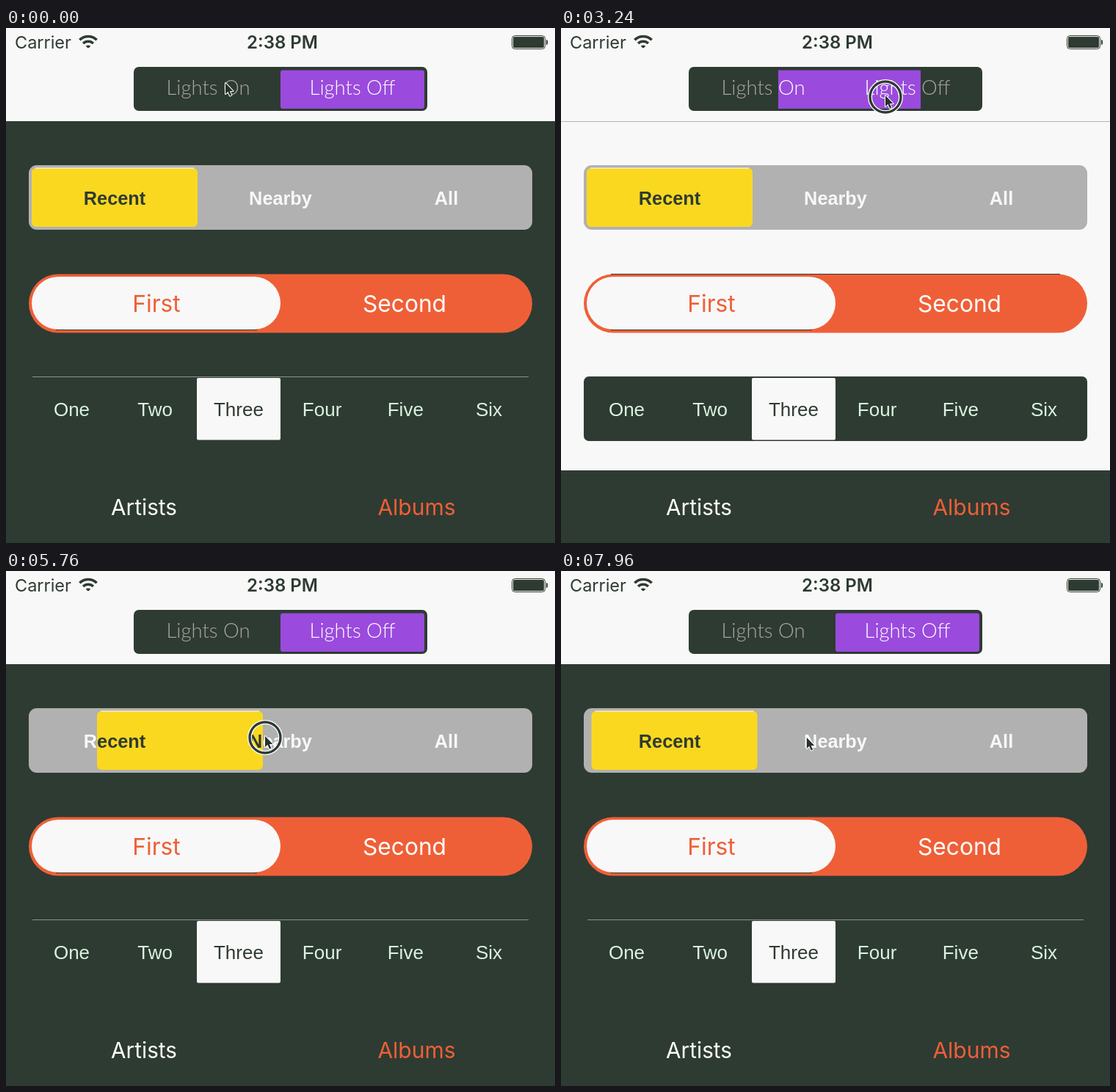
Write an HTML page with a canvas that moves like this. It is 748x702 px and loops after 8 s.

```html
<!DOCTYPE html>
<html lang="en">
<head>
<meta charset="utf-8">
<title>Segmented controls</title>
<style>
html, body { margin: 0; width: 100%; height: 100%; overflow: hidden; background: #f8f8f8; }
canvas { display: block; }
</style>
</head>
<body>
<canvas id="stage" width="748" height="702"></canvas>
<script>
const ctx = document.getElementById('stage').getContext('2d');
const LOOP = 8000, FRAME = 40;
const DARK = '#2e3b32', LIGHT = '#f8f8f8', GREY = '#b1b1b1', ORANGE = '#ef5f37',
      YELLOW = '#fbd820', PURPLE = '#9a4bdd';

const TAP = [120, 240], LIGHTS_DRAG = [880, 3440], RECENT_DRAG = [5200, 7866];

// time, pointer x, pointer y, distance from the dragged knob's left edge
const PATH = [
  [0, 299, 75, 142], [240, 305, 77, 142], [880, 320, 78, 142],
  [1480, 402, 80, 143], [2080, 324, 80, 143], [2400, 333, 80, 143],
  [3240, 442, 92, 146], [3440, 460, 92, 146], [3720, 455, 105, 160],
  [4880, 276, 218, 227], [5200, 262, 222, 227], [5760, 353, 225, 229],
  [6300, 440, 227, 227], [6900, 310, 229, 223], [7280, 367, 229, 222],
  [7866, 334, 227, 222], [8000, 335, 227, 222]
];

const during = (t, [start, end]) => t >= start && t < end;

// Smooth path through the points, flat at turning points
function sample(t, channel) {
  let i = 0;
  while (i < PATH.length - 2 && t >= PATH[i + 1][0]) i++;
  const slope = k => {
    const a = PATH[k - 1], b = PATH[k], c = PATH[k + 1];
    if (!a || !c || (b[channel] - a[channel]) * (c[channel] - b[channel]) <= 0) return 0;
    return (c[channel] - a[channel]) / (c[0] - a[0]);
  };
  const a = PATH[i], b = PATH[i + 1], span = b[0] - a[0], u = (t - a[0]) / span;
  const ease = u * u * (3 - 2 * u);
  return a[channel] + (b[channel] - a[channel]) * ease
    + span * u * (1 - u) * ((1 - u) * slope(i) - u * slope(i + 1));
}

function spring(from, to, ms) {
  const s = ms / 1000, decay = 23, freq = 20.3;
  const left = Math.exp(-decay * s) * (Math.cos(freq * s) + decay / freq * Math.sin(freq * s));
  return to + (from - to) * left;
}

const dragged = t => sample(t, 1) - sample(t, 3);

function lightsKnob(t) {
  if (t < TAP[1]) return 374;
  if (t < LIGHTS_DRAG[0]) return spring(374, 178, t - TAP[1]);
  if (t < LIGHTS_DRAG[1]) return Math.max(178, dragged(t));
  return spring(dragged(LIGHTS_DRAG[1]), 374, t - LIGHTS_DRAG[1]);
}

function recentKnob(t) {
  if (t < RECENT_DRAG[0]) return 35;
  if (t < RECENT_DRAG[1]) return Math.max(35, dragged(t));
  return spring(dragged(RECENT_DRAG[1]), 35, t - RECENT_DRAG[1]);
}

function box(x, y, w, h, r, color) {
  ctx.beginPath();
  ctx.roundRect(x, y, w, h, r);
  ctx.fillStyle = color;
  ctx.fill();
}

function text(label, x, y, font, color, align = 'center') {
  ctx.font = font;
  ctx.textAlign = align;
  ctx.fillStyle = color;
  ctx.fillText(label, x, y);
}

// track and knob: [x, y, w, h, radius, color]; labels: [text, centre x]
function control({ track, knob, labels, y, font, off, on, trim }) {
  const write = color => labels.forEach(([s, x]) => text(s, x, y, font, color));
  ctx.save();
  box(...track);
  ctx.clip();
  write(off);
  box(...knob);
  ctx.clip();
  write(on);
  ctx.restore();
  if (trim) box(...trim);
}

function statusBar() {
  text('Carrier', 12, 28, '23.5px Inter, sans-serif', DARK, 'left');
  text('2:38 PM', 376.5, 28, '600 24px Inter, sans-serif', DARK);
  ctx.strokeStyle = DARK;
  ctx.lineWidth = 3.6;
  for (const r of [2.8, 9.8, 16.5]) {
    ctx.beginPath();
    ctx.arc(112, 28, r, -Math.PI * 0.75, -Math.PI * 0.25);
    ctx.stroke();
  }
  ctx.lineWidth = 1;
  ctx.beginPath();
  ctx.roundRect(689.5, 10.5, 45, 18, 4);
  ctx.stroke();
  box(691, 12, 42, 15, 2, DARK);
  box(736, 16, 2, 7, [0, 2, 2, 0], DARK);
}

function pointer(t, pressed) {
  const x = sample(t, 1), y = sample(t, 2);
  if (pressed) {
    for (const [width, color] of [[6, '#fff'], [3.4, DARK]]) {
      ctx.beginPath();
      ctx.arc(x, y + 2, 21, 0, Math.PI * 2);
      ctx.lineWidth = width;
      ctx.strokeStyle = color;
      ctx.stroke();
    }
  }
  ctx.save();
  ctx.translate(x, y);
  const arrow = new Path2D('M0 0V15L3.4 11.8L6 17.5L8.4 16.4L5.8 11H10.5Z');
  ctx.lineWidth = 2;
  ctx.lineJoin = 'round';
  ctx.strokeStyle = '#fff';
  ctx.stroke(arrow);
  ctx.fillStyle = '#27312b';
  ctx.fill(arrow);
  ctx.restore();
}

function draw(t) {
  const lightsOff = t < TAP[1] || t >= LIGHTS_DRAG[1];
  const lightsDrag = during(t, LIGHTS_DRAG);
  const recentX = recentKnob(t);

  box(0, 0, 748, 702, 0, LIGHT);
  if (lightsOff) box(0, 127, 748, 575, 0, DARK);
  else box(0, 127, 748, 1, 0, '#b5b5b5');
  statusBar();

  control({
    track: [174, 53, 400, 60, 7, DARK],
    knob: [lightsKnob(t), 57.5, lightsDrag ? 194 : 196, 52.5, lightsDrag ? 0 : 3, PURPLE],
    labels: [['Lights On', 275.5], ['Lights Off', 472]],
    y: 91, font: '300 27.5px Lato, sans-serif', off: '#aba59f', on: '#fff'
  });

  control({
    track: [31, 187, 686, 88, 11, GREY],
    knob: [recentX, 191, 226, 80, 6, YELLOW],
    labels: [['Recent', 148], ['Nearby', 374], ['All', 600]],
    y: 241, font: 'bold 25.3px "Liberation Sans", sans-serif', off: LIGHT, on: DARK,
    trim: [recentX + 5, 190.5, 216, 1, 0, '#fff']
  });

  control({
    track: [31, 335.5, 686, 80, 40, ORANGE],
    knob: [35, 339, 339, 72, 36, LIGHT],
    labels: [['First', 205], ['Second', 543]],
    y: 387, font: '31.7px Inter, sans-serif', off: '#fff', on: ORANGE,
    trim: [68, 411, 274, 1, 0, DARK]
  });
  if (!lightsOff) box(68, 335, 612, 1, 0, DARK);

  control({
    track: [31, 475, 686, 88, 7, DARK],
    knob: [260, 477, 114, 84.5, 2, LIGHT],
    labels: ['One', 'Two', 'Three', 'Four', 'Five', 'Six'].map((s, i) => [s, 89.5 + i * 113.7]),
    y: 529, font: '26px "Liberation Sans", sans-serif', off: '#d9f3df', on: DARK
  });
  if (lightsOff) box(36, 475, 676, 1, 0, '#89958d');

  box(0, 603, 748, 99, 0, DARK);
  text('Artists', 188, 664, '29.7px Inter, sans-serif', '#fff');
  text('Albums', 559.5, 664, '30px Inter, sans-serif', ORANGE);

  pointer(t, [TAP, LIGHTS_DRAG, RECENT_DRAG].some(range => during(t, range)));
}

const start = performance.now();
function tick() {
  const t = (performance.now() - start) % LOOP;
  draw(Math.floor(t / FRAME) * FRAME);
  requestAnimationFrame(tick);
}
tick();
</script>
</body>
</html>
```
